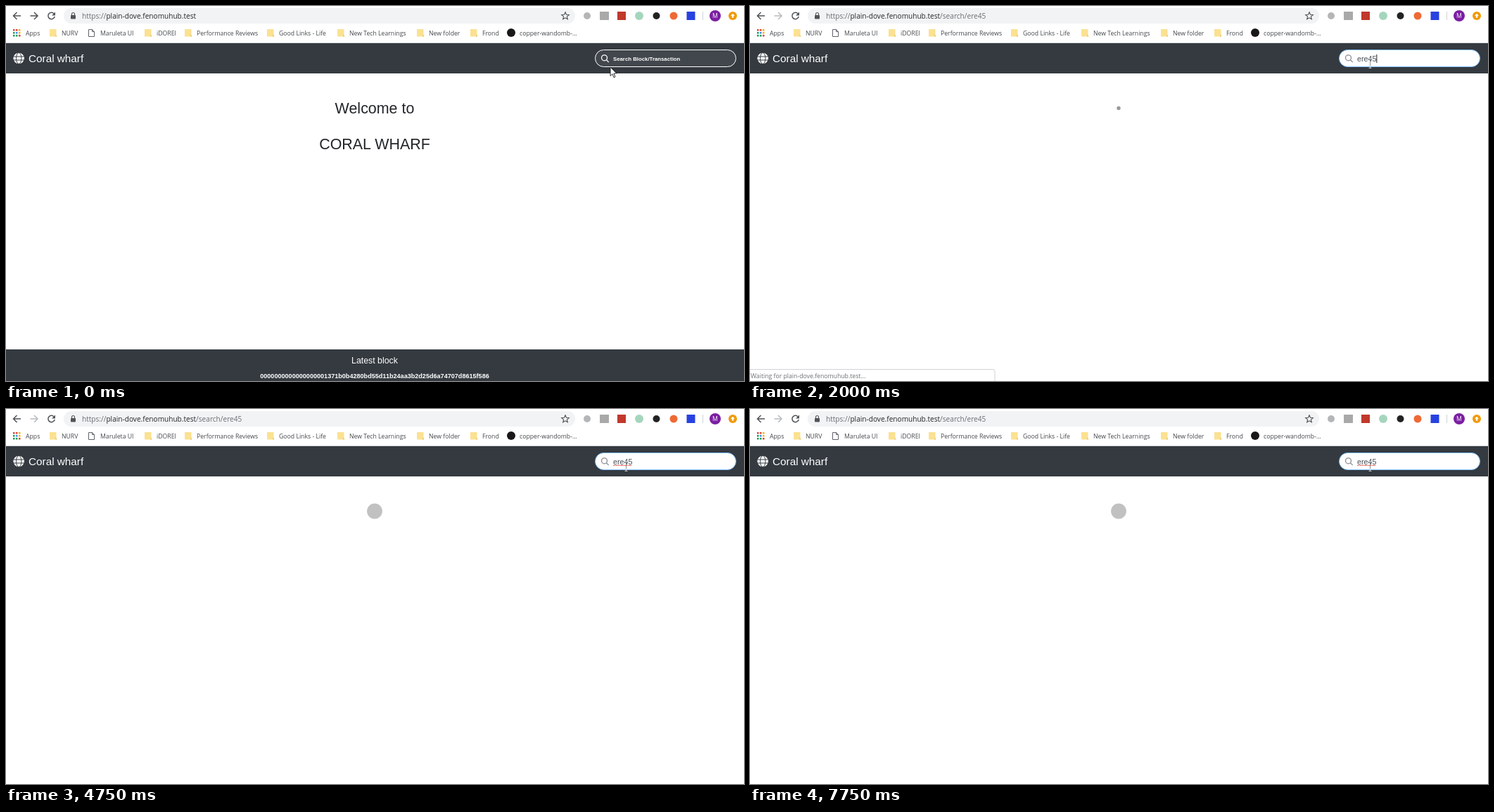
Recreate the animation shown at these times as an HTML page. Size 1049x534 px, loop 8 s.

```html
<!DOCTYPE html>
<html lang="en">
<head>
<meta charset="utf-8">
<title>Block search</title>
<style>
  html, body { margin: 0; width: 100%; height: 100%; overflow: hidden; background: #fff; }
  svg { display: block; font-family: "Liberation Sans", Arial, sans-serif; }
  .ui { font-family: "Open Sans", "Noto Sans", sans-serif; font-size: 8.7px; fill: #45484c; }
  .url { font-size: 10.1px; fill: #6b6f74; }
  .line { fill: none; stroke: #505458; stroke-width: 1.5; }
  .mid { text-anchor: middle; }
</style>
</head>
<body>
<svg width="1049" height="534" viewBox="0 0 1049 534">
  <!-- browser toolbar -->
  <path class="line" d="M21 14H10.5M15.5 9l-5 5 5 5"/>
  <path id="forward" class="line" d="M34.500 14H45M40 9l5 5-5 5"/>
  <path class="line" d="M68 10.700a4.700 4.700 0 1 0 1.200 4.300"/>
  <path d="M70 8.500v5h-5z" fill="#505458"/>
  <rect x="82" y="3" width="727" height="22" rx="11" fill="#f1f3f4"/>
  <rect x="92" y="13" width="7" height="5.500" rx=".8" fill="#505458"/>
  <path class="line" d="M93.500 13v-1.500a2 2 0 0 1 4 0V13" style="stroke-width:1.100"/>
  <text class="ui url" x="108" y="17.500">https://<tspan fill="#25282b" class="host"></tspan><tspan id="path"></tspan></text>
  <path class="line" d="M795 8.800l1.500 3.500 3.800.3-2.900 2.500.9 3.700-3.300-2-3.300 2 .9-3.700-2.900-2.500 3.800-.3z" style="stroke-width:1.100"/>
  <circle cx="826" cy="14" r="5" fill="#b4b6b8"/>
  <rect x="844" y="8" width="13" height="12" fill="#a9a9a9"/>
  <rect x="869" y="8" width="12" height="12" fill="#c0392b"/>
  <circle cx="900" cy="14" r="6" fill="#a5d6bd"/>
  <circle cx="924.500" cy="14" r="5" fill="#222"/>
  <circle cx="949" cy="14" r="5.500" fill="#ee6a35"/>
  <rect x="967.500" y="8" width="12" height="12" fill="#2742e0"/>
  <path d="M990.500 8v12" stroke="#d0d3d6"/>
  <circle cx="1008" cy="14" r="8" fill="#7b1fa2"/>
  <text class="ui mid" x="1008" y="17" style="fill:#fff">M</text>
  <circle cx="1033" cy="14" r="6" fill="#f29900"/>
  <path d="M1033 10.800l3 3.200h-1.800v2.800h-2.400V14h-1.800z" fill="#fff"/>

  <!-- bookmarks -->
  <g id="bookmarks" class="ui"></g>
  <path d="M117.500 33.500h5l3 3v7h-8zM122.500 33.500v3h3" fill="none" stroke="#5f6368"/>
  <circle cx="718" cy="38" r="6" fill="#191717"/>
  <path d="M0 52.500H1049" stroke="#d2d4d6"/>

  <!-- page header -->
  <rect y="53" width="1049" height="43" fill="#343a40"/>
  <circle cx="18.200" cy="74.500" r="7.800" fill="#fff"/>
  <g fill="none" stroke="#343a40" stroke-width="1">
    <ellipse cx="18.200" cy="74.500" rx="3.700" ry="8"/>
    <path d="M10 72h16.500M10 77h16.500"/>
  </g>
  <text x="32" y="80" font-size="15.300" fill="#fff">Coral wharf</text>

  <!-- search field -->
  <rect id="field" x="837.500" y="62.500" width="200" height="24" rx="12"/>
  <g id="lens" fill="none" stroke-width="1.300">
    <circle cx="850.500" cy="73.800" r="4"/>
    <path d="M853.500 76.800l3.200 3.300"/>
  </g>
  <text id="hint" x="863" y="77.500" font-size="7.800" font-weight="bold">Search Block/Transaction</text>
  <text id="query" x="863" y="78.800" font-size="10.700" fill="#495057"></text>
  <path id="squiggle" fill="none" stroke="#e04a3f" stroke-width=".9"/>
  <path id="caret" d="M0 69V81" stroke="#222"/>
  <path id="arrow" d="M0 0v12.500l2.900-2.700 2.100 4.900 2-.9-2.100-4.800h4z" fill="#fff" stroke="#111" stroke-width=".9"/>
  <g id="beam" fill="none">
    <path d="M881.500 77v8" stroke="#777" stroke-width=".8"/>
    <path d="M881.500 85v3M879.500 88.300h4" stroke="#ddd" stroke-width=".9"/>
  </g>

  <!-- welcome page -->
  <g id="welcome">
    <g class="mid" font-size="21.450" fill="#212529">
      <text x="524" y="153">Welcome to</text>
      <text x="524" y="204">CORAL WHARF</text>
    </g>
    <rect y="489" width="1049" height="45" fill="#343a40"/>
    <g class="mid" fill="#fff">
      <text x="524" y="508.500" font-size="12.350">Latest block</text>
      <text id="hash" x="524" y="530" font-size="9.080" font-weight="bold"></text>
    </g>
  </g>

  <!-- loading page -->
  <circle id="pulse" cx="524" cy="145.500"/>
  <g id="status">
    <path d="M-1 517.500H345q3 0 3 3V535H-1z" fill="#fff" stroke="#d0d2d4"/>
    <text class="ui" x="1" y="529.500" style="fill:#6b6f74">Waiting for <tspan class="host"></tspan>...</text>
  </g>
</svg>
<script>
const $ = id => document.getElementById(id);
const set = (id, attrs) => { for (const k in attrs) $(id).setAttribute(k, attrs[k]); };
const show = (id, on) => set(id, { visibility: on ? "visible" : "hidden" });

const LOOP = 8000, STEP = 250, FOCUS = 750, SEARCH = 2000, SETTLED = 2500;
const QUERY = "ere45";
// Characters in the field for each step from FOCUS on
const TYPED = [0, 1, 2, 4, 5];

document.querySelectorAll(".host").forEach(e => e.textContent = "plain-dove.fenomuhub.test");
$("hash").textContent = "0".repeat(18) + "1371b0b4280bd55d11b24aa3b2d25d6a74707d8615f586";

const label = (x, name) => `<text x="${x}" y="41.500">${name}</text>`;
const folder = (x, name) =>
  `<path d="M${x - 17} 33h9.500v8l1 2.500h-10.500z" fill="#fbe191"/>
   <path d="M${x - 8.5} 40v3.500h1.500z" fill="#e3bd55"/>` + label(x, name);
const appColors = ["#db4437", "#db4437", "#f4b400", "#0f9d58", "#4285f4", "#f4b400", "#0f9d58", "#0f9d58", "#db4437"];
$("bookmarks").innerHTML =
  appColors.map((c, i) =>
    `<rect x="${10 + i % 3 * 4}" y="${33 + (i / 3 | 0) * 4}" width="2.500" height="2.500" fill="${c}"/>`).join("") +
  label(28, "Apps") + label(134, "Maruleta UI") + label(730, "copper-wandomb-...") +
  [[79, "NURV"], [214, "iDOREl"], [271, "Performance Reviews"], [388, "Good Links - Life"],
   [488, "New Tech Learnings"], [601, "New folder"], [677, "Frond"]].map(f => folder(...f)).join("");

set("squiggle", { d: "M863 81" + "l1.200 -1.200l1.200 1.200".repeat(11) });

function draw(now) {
  const t = Math.floor(now % LOOP / STEP) * STEP;
  const focused = t >= FOCUS, searching = t >= SEARCH;
  const count = focused ? TYPED[Math.min((t - FOCUS) / STEP, 4)] : 0;

  set("field", { fill: focused ? "#fff" : "#42474d", stroke: focused ? "#80bdff" : "#fff" });
  set("lens", { stroke: focused ? "#8a8d90" : "#fff" });
  set("hint", { fill: focused ? "#8a8d90" : "#fff" });
  show("hint", !count);
  $("query").textContent = QUERY.slice(0, count);
  set("caret", { transform: `translate(${863.5 + $("query").getComputedTextLength()} 0)` });
  show("caret", focused && (count < 5 || t % 1060 >= 530));
  show("squiggle", t >= SETTLED);

  set("arrow", { transform: `translate(${859 + t / 25} ${87 + t / 60})` });
  show("arrow", t < 500);
  show("beam", t >= 500);

  set("forward", { style: searching ? "stroke:#b9bcbf" : "" });
  $("path").textContent = searching ? "/search/" + QUERY : "";
  show("welcome", !searching);
  show("status", searching && t < SETTLED);

  const grow = (t + 250) % 750 / 250;
  set("pulse", { r: 2.7 + 4.1 * grow, "fill-opacity": 0.4 - 0.078 * grow });
  show("pulse", searching);

  requestAnimationFrame(() => draw(performance.now()));
}
draw(0);
</script>
</body>
</html>
```
